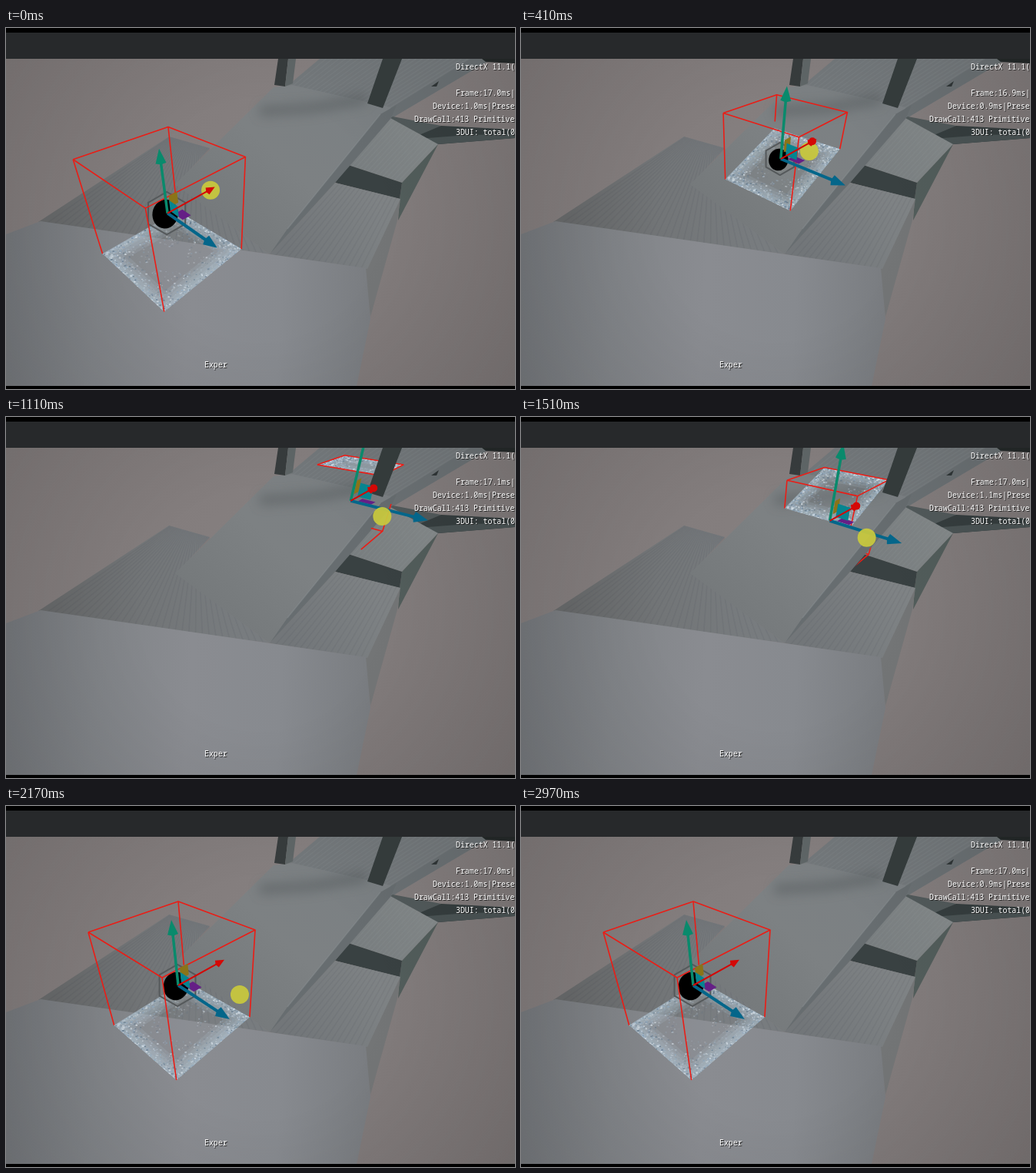
Animation of 662 by 469 pixels, one loop 3.02 s. Source, as an HTML page with a canvas:

```html
<!DOCTYPE html>
<html lang="en">
<head>
<meta charset="utf-8">
<title>Decal box on a ramp</title>
<style>
  html, body { margin: 0; width: 100%; height: 100%; overflow: hidden; background: #000; }
  #stage { position: relative; width: 662px; height: 469px; overflow: hidden; }
  canvas { display: block; }
  p {
    position: absolute; margin: 0; white-space: pre; color: #fff;
    font: 9.9px/14px "Noto Sans Mono", "DejaVu Sans Mono", monospace;
    text-shadow: 1px 1px 0 #222;
  }
</style>
</head>
<body>
<div id="stage">
  <canvas id="view" width="662" height="469"></canvas>
  <p style="left:585px;top:43px">DirectX 11.1(</p>
  <p style="left:585px;top:77px" id="frame"></p>
  <p style="left:555px;top:94px" id="device"></p>
  <p style="left:531px;top:111px">DrawCall:413 Primitive</p>
  <p style="left:585px;top:128px">3DUI: total(0</p>
  <p style="left:258px;top:430px">Exper</p>
</div>
<script>
const W = 662, H = 469, LOOP = 3020;
const ctx = document.getElementById('view').getContext('2d');
const frameText = document.getElementById('frame');
const deviceText = document.getElementById('device');

// Vanishing points of the three axes
const RED = [741, -53], GREEN = [284, 800], BLUE = [-222, -60];
// Box at rest: x, y and depth of the top corners (left, front, right, back) and the centre
const TOP = [[107, 164, 3.07], [203, 223, 2.4], [324, 161, 3.16], [224, 124, 3.77]];
const CENTRE = [224, 233, 3.55];
const DEPTH = .73, HEIGHT = .78;

// Distance along the red axis over time
const TRAVEL = [[0, -.093], [410, 1], [1110, 2.72], [1510, 1.86], [1890, .335], [2170, 0], [LOOP, 0]];
// Pointer relative to the centre over time
const POINTER = [[0, 56, -30], [410, 37, -10], [1110, 41, 20], [1510, 48, 22], [1890, 78, 21], [2170, 80, 12]];
const POINTER_END = 2480;
const STAT_STEP = 380;
const FRAME_MS = [17, 16.9, 17.1, 17, 16.7, 17, 17, 17];
const DEVICE_MS = [1, .9, 1, 1.1, .9, 1, 1, .9];

const lerp = (a, b, k) => a + (b - a) * k;
const between = (p, q, k) => [lerp(p[0], q[0], k), lerp(p[1], q[1], k)];
const clamp = (v, lo, hi) => Math.min(hi, Math.max(lo, v));

function segment(keys, x) {
  let i = 0;
  while (i < keys.length - 2 && x >= keys[i + 1][0]) i++;
  return i;
}

function mix(keys, x) {
  const i = segment(keys, x), a = keys[i], b = keys[i + 1];
  const k = clamp((x - a[0]) / (b[0] - a[0]), 0, 1);
  return a.slice(1).map((v, n) => lerp(v, b[n + 1], k));
}

// Monotone cubic, at rest at both ends and at turning points
function travel(t) {
  const slope = i => (TRAVEL[i + 1][1] - TRAVEL[i][1]) / (TRAVEL[i + 1][0] - TRAVEL[i][0]);
  const tangent = i => {
    if (i === 0 || i === TRAVEL.length - 1) return 0;
    const a = slope(i - 1), b = slope(i);
    return a * b <= 0 ? 0 : 2 * a * b / (a + b);
  };
  const i = segment(TRAVEL, t), [x0, y0] = TRAVEL[i], [x1, y1] = TRAVEL[i + 1];
  const d = x1 - x0, k = (t - x0) / d, k2 = k * k, k3 = k2 * k;
  return (2 * k3 - 3 * k2 + 1) * y0 + (3 * k2 - 2 * k3) * y1 +
    (k3 - 2 * k2 + k) * d * tangent(i) + (k3 - k2) * d * tangent(i + 1);
}

// Perspective: moving by d at depth h closes d / (h + d) of the way to the vanishing point
const slide = ([x, y, h], s) => [...between([x, y], RED, s / (h + s)), h + s];
const lower = ([x, y, h], d) => between([x, y], GREEN, d / (h + d));

// Height of the box top above flat ground, then above the rising ramp
const clearance = x => clamp(.95 - .37 * x, 0, .72);

function random(seed) {
  return () => {
    seed = (seed * 16807) % 2147483647;
    return seed / 2147483647;
  };
}

function trace(c, pts, closed = true) {
  c.beginPath();
  pts.forEach(p => c.lineTo(p[0], p[1]));
  if (closed) c.closePath();
}

function poly(c, fill, ...pts) {
  trace(c, pts);
  c.fillStyle = fill;
  c.fill();
}

function line(c, color, width, ...pts) {
  trace(c, pts, false);
  c.strokeStyle = color;
  c.lineWidth = width;
  c.stroke();
}

function disc(x, y, r, color) {
  ctx.fillStyle = color;
  ctx.beginPath();
  ctx.arc(x, y, r, 0, Math.PI * 2);
  ctx.fill();
}

function ribs(c, n, a, b, p, q, color) {
  for (let i = 1; i < n; i++) line(c, color, 1.5, between(a, b, i / n), between(p, q, i / n));
}

function ramp(c, x0, y0, x1, y1, ...colors) {
  const g = c.createLinearGradient(x0, y0, x1, y1);
  colors.forEach((color, i) => g.addColorStop(i / (colors.length - 1), color));
  return g;
}

function layer(draw) {
  const el = document.createElement('canvas');
  el.width = W;
  el.height = H;
  draw(el.getContext('2d'));
  return el;
}

const scene = layer(c => {
  const light = 'rgba(160,165,168,.1)', dark = 'rgba(40,45,48,.06)';
  c.fillStyle = ramp(c, 0, 40, W, 465, '#7f7979', '#868080', '#7b7575');
  c.fillRect(0, 0, W, H);

  // Upper platform
  poly(c, '#73787b', [365, 76], [408, 40], [632, 40], [500, 118], [470, 100]);
  ribs(c, 26, [408, 40], [626, 40], [365, 76], [500, 117], light);
  poly(c, '#6b7174', [604, 40], [632, 40], [500, 118], [494, 108]);
  poly(c, '#303637', [553, 76], [563, 69], [560, 76]);

  // Beams on the right
  poly(c, '#525a5b', [496, 120], [503, 115], [566, 127], [545, 141]);
  poly(c, '#363e3f', [523, 145], [566, 127], [662, 132], [662, 143], [550, 152]);
  poly(c, '#4b5455', [523, 145], [600, 139], [662, 138], [662, 143], [550, 152]);
  poly(c, '#242929', [619, 40], [662, 40], [662, 46], [624, 44]);

  // Block
  poly(c, ramp(c, 445, 178, 550, 130, '#777c7e', '#858a8b'), [445, 178], [500, 117], [562, 151], [515, 201]);
  ribs(c, 14, [500, 117], [562, 151], [445, 178], [515, 201], light);
  poly(c, '#525d5b', [515, 201], [562, 151], [510, 250], [512, 222]);
  poly(c, '#394142', [445, 178], [515, 201], [512, 222], [428, 201]);

  // Left wedge
  poly(c, ramp(c, 60, 240, 290, 190, '#67696a', '#727577', '#787c7f'),
    [42, 252], [212, 141], [265, 156], [222, 203], [343, 294]);
  ribs(c, 34, [212, 141], [265, 156], [45, 252], [343, 294], dark);

  // Lower right slope
  poly(c, '#737576', [513, 222], [509, 250], [474, 375], [466, 312]);
  poly(c, ramp(c, 370, 290, 500, 220, '#727679', '#808486'), [343, 294], [428, 201], [513, 222], [470, 313]);
  ribs(c, 16, [428, 201], [513, 222], [343, 294], [470, 313], dark);

  // Main ramp
  poly(c, ramp(c, 260, 250, 430, 70, '#75797b', '#7d8183', '#7b8083'),
    [220, 203], [348, 77], [372, 74], [500, 103], [500, 118], [343, 294]);
  c.save();
  c.filter = 'blur(7px)';
  line(c, 'rgba(76,81,84,.4)', 14, [330, 108], [400, 104], [468, 92]);
  c.restore();
  poly(c, '#676d70', [343, 294], [366, 261], [487, 112], [508, 100], [500, 118], [428, 201]);
  line(c, 'rgba(150,155,158,.3)', 1.5, [366, 261], [487, 112]);

  // Foreground platform
  poly(c, ramp(c, 0, 350, 475, 380, '#74777b', '#818488', '#8a8c91', '#878a8f', '#797c80'),
    [0, 268], [45, 251], [468, 312], [474, 378], [456, 465], [0, 465]);

  // Left post
  poly(c, '#373c3d', [354, 40], [367, 40], [363, 76], [349, 74]);
  poly(c, '#5f6667', [367, 40], [377, 40], [373, 72], [363, 76]);

  const shade = c.createRadialGradient(330, 250, 150, 330, 250, 470);
  shade.addColorStop(0, 'rgba(0,0,0,0)');
  shade.addColorStop(1, 'rgba(0,0,0,.13)');
  c.fillStyle = shade;
  c.fillRect(0, 40, W, 425);
});

const overlay = layer(c => {
  poly(c, '#343b3b', [490, 40], [515, 40], [490, 104], [470, 98]);
  c.fillStyle = '#000';
  c.fillRect(0, 0, W, 6);
  c.fillRect(0, 465, W, 4);
  c.fillStyle = '#27292b';
  c.fillRect(0, 6, W, 34);
});

// Frost flakes in drifting clusters, denser towards the rim
const flakes = (() => {
  const rnd = random(77), tones = ['#e9f1f8', '#c0d0df', '#8ea9c2', '#526a80'];
  return Array.from({ length: 1500 }, () => {
    const along = rnd(), cluster = .5 + .5 * Math.sin(along * 23);
    const depth = Math.pow(rnd(), 2) * (.2 + .2 * cluster);
    const [u, v] = [[depth, along], [1 - depth, along], [along, depth], [along, 1 - depth]][Math.floor(rnd() * 4)];
    return { u, v, size: .6 + rnd() * 1.3, tone: tones[Math.floor(rnd() * 4)], alpha: (.75 - depth) * rnd() };
  });
})();

function drawPatch([l, f, r, b]) {
  ctx.save();
  trace(ctx, [l, f, r, b]);
  ctx.clip();
  ctx.fillStyle = 'rgba(150,157,164,.12)';
  ctx.fill();
  const span = Math.hypot(f[0] - l[0], f[1] - l[1]);
  ctx.strokeStyle = 'rgba(190,208,224,.12)';
  for (let i = 1; i <= 5; i++) {
    ctx.lineWidth = span * i * .075;
    ctx.stroke();
  }
  for (const { u, v, size, tone, alpha } of flakes) {
    const [x, y] = between(between(l, f, u), between(b, r, u), v);
    ctx.globalAlpha = alpha;
    ctx.fillStyle = tone;
    ctx.fillRect(x, y, size * 1.4, size);
  }
  ctx.restore();
}

function drawBox(top, base) {
  const color = '#ea1d16', width = 1.6, [l, f, r, b] = top;
  ctx.lineJoin = 'round';
  line(ctx, color, width, l, b, r, f, l);
  [0, 1, 2].forEach(i => line(ctx, color, width, top[i], base[i]));
  line(ctx, color, width, b, between(b, base[3], .8));

  // The lower half shows again past the edge of the ramp
  const low = top.map(p => lower(p, HEIGHT));
  ctx.save();
  trace(ctx, [[428, 203], [500, 113], [562, 113], [562, 203]]);
  ctx.clip();
  line(ctx, color, width, low[1], low[2], low[3]);
  line(ctx, color, width, r, low[2]);
  ctx.restore();
}

function drawIcon([x, y, h], s) {
  const r = 96 / h;
  const hex = Array.from({ length: 6 }, (_, i) =>
    [x - 1 + r * Math.sin(i * Math.PI / 3), y + r * Math.cos(i * Math.PI / 3)]);
  ctx.save();
  ctx.globalAlpha = clamp((1.5 - s) / .35, 0, 1);
  poly(ctx, 'rgba(125,128,130,.45)', ...hex);
  ctx.strokeStyle = '#55595b';
  ctx.lineWidth = 2;
  ctx.stroke();
  ctx.fillStyle = '#000';
  ctx.beginPath();
  ctx.ellipse(x - 3, y + 1, r * .6, r * .68, .15, 0, Math.PI * 2);
  ctx.fill();
  ctx.restore();
}

function arrow([x, y], [dx, dy], color, head, half, width) {
  const len = Math.hypot(dx, dy), ux = dx / len, uy = dy / len;
  const tip = [x + dx, y + dy], neck = [tip[0] - ux * head, tip[1] - uy * head];
  line(ctx, color, width, [x, y], neck);
  poly(ctx, color, tip, [neck[0] - uy * half, neck[1] + ux * half],
    [neck[0] - ux * 2, neck[1] - uy * 2], [neck[0] + uy * half, neck[1] - ux * half]);
}

function plane([x, y], a, b, color) {
  const at = (i, j) => [x + a[0] * i + b[0] * j, y + a[1] * i + b[1] * j];
  poly(ctx, color, at(.07, .07), at(.24, .07), at(.24, .24), at(.07, .24));
}

function drawGizmo(o, s, t) {
  const axis = (vanish, k) => [(vanish[0] - o[0]) * k, (vanish[1] - o[1]) * k];
  const red = axis(RED, .116), green = axis(GREEN, -.15), blue = axis(BLUE, -.15);
  arrow(o, green, '#098a6c', 19, 7, 3.5);
  plane(o, red, green, '#8a7418');
  plane(o, red, blue, '#651f86');
  plane(o, green, blue, '#068590');
  arrow(o, blue, '#04668a', 18, 7, 4);
  if (t < POINTER_END) {
    const [dx, dy] = mix(POINTER, t);
    disc(o[0] + dx, o[1] + dy, 12, 'rgba(200,200,62,.94)');
  }
  arrow(o, red, '#d40806', 11, 5, 2);
  // Seen from behind, the arrowhead shows its round base
  disc(o[0] + red[0] * .88, o[1] + red[1] * .88, clamp(s * 5, 0, 5), '#d40806');
}

function draw(t) {
  const s = travel(t), centre = slide(CENTRE, s);
  const top = TOP.map(p => slide(p, s));
  const base = top.map((p, i) => lower(p, clearance(i < 2 ? s : s + DEPTH)));
  ctx.drawImage(scene, 0, 0);
  drawPatch(base);
  drawIcon(centre, s);
  drawBox(top, base);
  // The post hides the box, the gizmo stays in front of it
  ctx.drawImage(overlay, 0, 0);
  ctx.save();
  ctx.beginPath();
  ctx.rect(0, 40, W, 425);
  ctx.clip();
  drawGizmo(centre, s, t);
  ctx.restore();

  const i = Math.floor(t / STAT_STEP);
  frameText.textContent = `Frame:${FRAME_MS[i].toFixed(1)}ms|`;
  deviceText.textContent = `Device:${DEVICE_MS[i].toFixed(1)}ms|Prese`;
}

const start = performance.now();
function tick(now) {
  draw(Math.max(0, now - start) % LOOP);
  requestAnimationFrame(tick);
}
draw(0);
requestAnimationFrame(tick);
</script>
</body>
</html>
```
